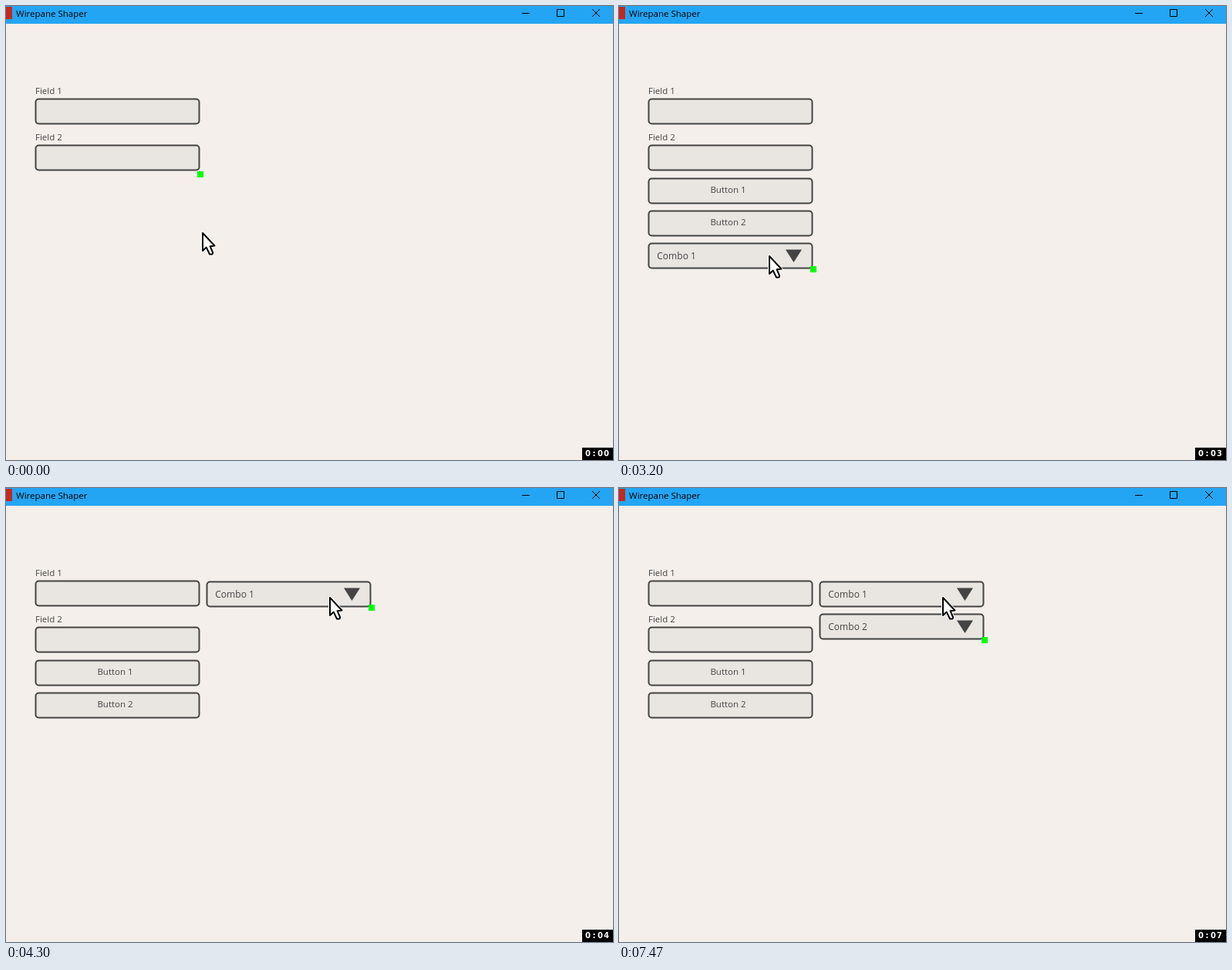
An HTML page with a canvas for the animation above (8 s loop, 787x588 px).

```html
<!DOCTYPE html>
<html lang="en">
<head>
<meta charset="utf-8">
<title>Form builder</title>
<style>
  html, body { margin: 0; width: 100%; height: 100%; overflow: hidden; background: #f4efeb; }
  canvas { display: block; }
</style>
</head>
<body>
<canvas id="stage" width="787" height="588"></canvas>
<script>
const ctx = document.getElementById('stage').getContext('2d');
const LOOP = 8000;
const INK = '#444444';
const uiFont = size => `${size}px "Open Sans", "Noto Sans", sans-serif`;
const CLOCK_FONT = 'bold 10px "DejaVu Sans", sans-serif';

const LEFT = 38, STACK_TOP = 223, ROW = 42;
const REST = { x: 254, y: 292 };
const GRAB = { x: 194, y: 322 };
const DROP = { x: 419, y: 140 };
const SNAPPED = { x: 260, y: 121 };
const REACH = { start: 2620, length: 450 };
const DRAG = { start: 3510, length: 318 };
const POINTER_LEAD = 13;

const progress = (t, { start, length }) => Math.min(1, Math.max(0, (t - start) / length));
const easeOut = p => 1 - (1 - p) ** 2;
const smooth = p => p * p * (3 - 2 * p);
const mix = (a, b, p) => Math.round(a + (b - a) * p);

const refresh = t => Math.floor((t - DRAG.start) / 140) * 140 + DRAG.start;

function mouseAt(t) {
  const reach = smooth(progress(t, REACH));
  const drag = progress(t, DRAG);
  return {
    x: mix(mix(REST.x, GRAB.x, reach), DROP.x, easeOut(drag)),
    y: mix(mix(REST.y, GRAB.y, reach), DROP.y, smooth(drag))
  };
}

function comboAt(t) {
  if (t >= 4300) {
    const nudged = t >= 5210 && t < 5670;
    return { x: SNAPPED.x, y: SNAPPED.y + (nudged ? 6 : 0) };
  }
  const home = { x: LEFT, y: STACK_TOP + 2 * ROW };
  const frame = refresh(t);
  if (frame <= DRAG.start) return home;
  const mouse = mouseAt(frame);
  return { x: home.x + mouse.x - GRAB.x, y: home.y + mouse.y - GRAB.y };
}

function pointerAt(t) {
  const frame = refresh(t);
  return mouseAt(frame > DRAG.start ? frame + POINTER_LEAD : frame);
}

function rect(x, y, w, h, color) {
  ctx.fillStyle = color;
  ctx.fillRect(x, y, w, h);
}

function text(str, x, y, { color = INK, align = 'left', font = uiFont(11.5) } = {}) {
  ctx.font = font;
  ctx.textAlign = align;
  ctx.fillStyle = color;
  ctx.fillText(str, x, y);
}

function polygon(points) {
  ctx.beginPath();
  points.forEach(([x, y]) => ctx.lineTo(x, y));
  ctx.closePath();
}

function stroke(color, width) {
  ctx.strokeStyle = color;
  ctx.lineWidth = width;
  ctx.stroke();
}

function fill(color) {
  ctx.fillStyle = color;
  ctx.fill();
}

function box(x, y) {
  ctx.beginPath();
  ctx.roundRect(x + 0.5, y + 0.5, 212, 32, 4);
  fill('#e9e5e1');
  stroke(INK, 2);
}

function field(label, x, y) {
  text(label, x, y - 6);
  box(x, y);
}

function button(label, x, y) {
  box(x, y);
  text(label, x + 103.5, y + 19, { align: 'center' });
}

function combo(label, x, y) {
  box(x, y);
  text(label, x + 11.3, y + 21, { font: uiFont(12) });
  polygon([[x + 178, y + 8.5], [x + 199, y + 8.5], [x + 188.5, y + 25]]);
  fill(INK);
}

function handle(x, y) {
  rect(x + 210, y, 8, 8, '#00ff00');
}

function titleBar() {
  rect(0, 0, 787, 23, '#24a5f3');
  rect(-8, 1, 16, 16, '#c4281f');
  text('Wirepane Shaper', 13, 14, { color: '#000' });
  ctx.beginPath();
  ctx.moveTo(669, 9.5);
  ctx.lineTo(679, 9.5);
  ctx.rect(714.5, 4.5, 9, 9);
  ctx.moveTo(760, 4);
  ctx.lineTo(770, 14);
  ctx.moveTo(770, 4);
  ctx.lineTo(760, 14);
  stroke('#000', 1);
}

function pointer({ x, y }) {
  ctx.save();
  ctx.translate(x + 1, y + 2);
  ctx.lineJoin = 'round';
  polygon([[0, 0], [0, 23], [4.8, 18.6], [9, 27.5],
           [12.5, 27.5], [13.2, 25.5], [9.6, 17.2], [15.5, 16.5]]);
  stroke('#fff', 4);
  fill('#fff');
  stroke('#000', 2);
  ctx.restore();
}

function clock(t) {
  const seconds = Math.floor((t + 125) / 1025);
  rect(747, 572, 40, 16, '#000');
  [...`0:0${seconds}`].forEach((char, i) =>
    text(char, 754.5 + i * 8, 583, { color: '#fff', align: 'center', font: CLOCK_FONT }));
}

function widgets(t) {
  field('Field 1', LEFT, 120);
  field('Field 2', LEFT, 180);

  const buttons = [1050, 1460].filter(time => t >= time).length;
  for (let i = 0; i < buttons; i++) button(`Button ${i + 1}`, LEFT, STACK_TOP + i * ROW);

  if (t >= 2520) {
    const { x, y } = comboAt(t);
    const combos = t >= 7470 ? 2 : 1;
    for (let i = 0; i < combos; i++) combo(`Combo ${i + 1}`, x, y + i * ROW);
    handle(x, y + 30 + (combos - 1) * ROW);
  } else {
    handle(LEFT, buttons ? STACK_TOP + 30 + (buttons - 1) * ROW : 214);
  }
}

function draw(t) {
  rect(0, 0, 787, 588, '#f4efeb');
  titleBar();
  widgets(t);
  pointer(pointerAt(t));
  clock(t);
}

const start = performance.now();
function tick() {
  draw((performance.now() - start) % LOOP);
  requestAnimationFrame(tick);
}
tick();
</script>
</body>
</html>
```
